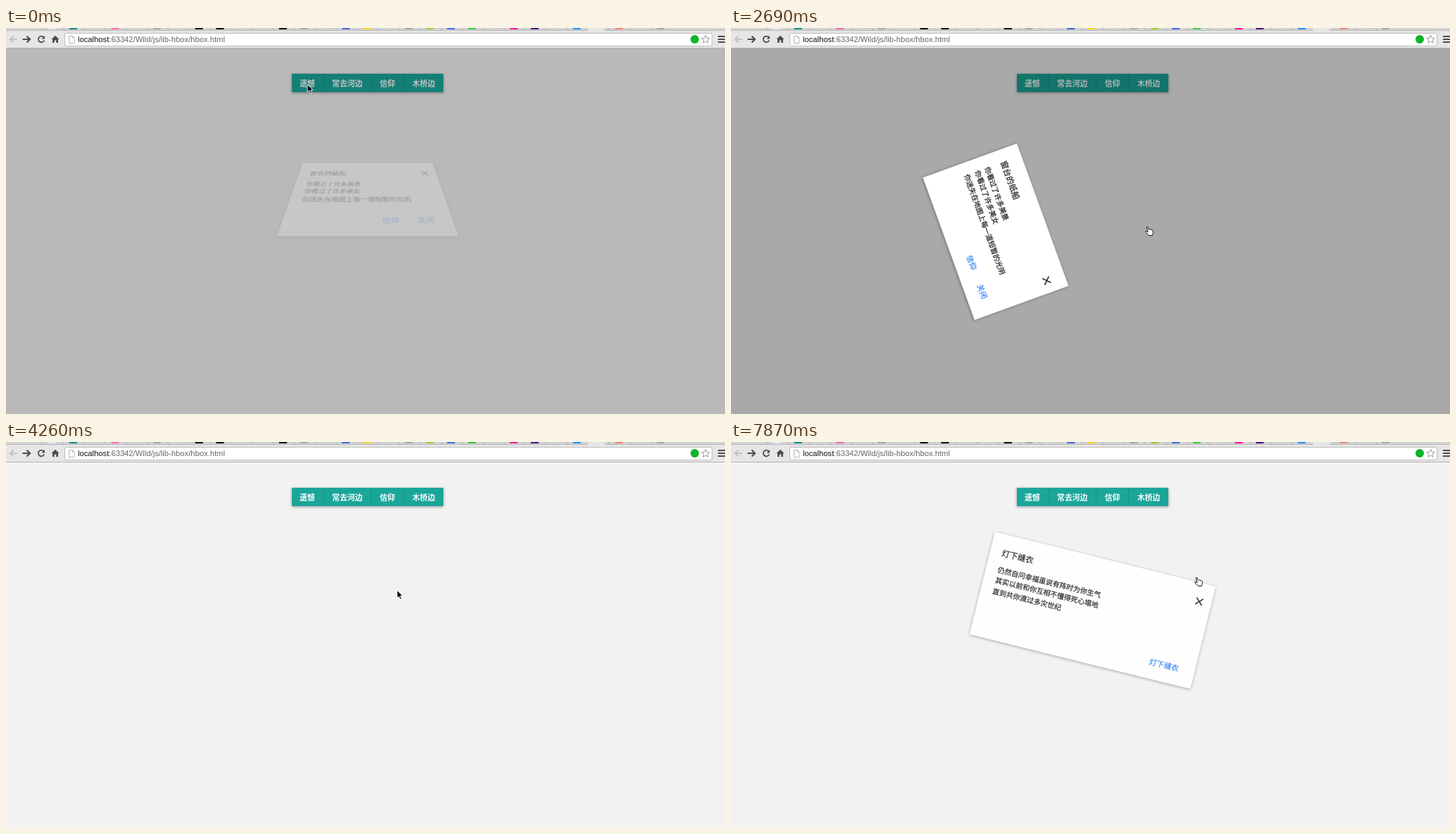
An HTML page for the animation above (8 s loop, 1021 by 548 pixels).

```html
<!DOCTYPE html>
<html lang="zh">
<head>
<meta charset="utf-8">
<title>hbox</title>
<style>
html, body { margin: 0; width: 100%; height: 100%; overflow: hidden; background: #f2f2f2; }
body { position: relative; font-family: "Noto Sans CJK SC", "Noto Sans CJK", sans-serif; }
body > *, .box * { position: absolute; }
#chrome { left: 0; top: 0; }
#bar { left: 405.5px; top: 65px; width: 215.5px; height: 26px; display: flex; background: #1aa699; box-shadow: 0 1px 4px rgba(0,0,0,.4); }
#bar b { padding: 0 12px 0 11.5px; font-size: 10.8px; line-height: 26px; color: #fff; white-space: nowrap; }
#bar b + b { border-left: 1px solid #17958a; }
#shade { left: 0; top: 29px; width: 1021px; height: 519px; background: #000; }
.box { top: 164px; background: #fff; box-shadow: 0 1px 4px rgba(0,0,0,.35); border-radius: 1px; }
.box span { line-height: 16px; white-space: nowrap; color: #1c1c1c; font-size: 10.05px; -webkit-text-stroke: .2px; }
.box .title { left: 17px; top: 18px; font-size: 11.5px; }
.box .act { color: #3483f8; font-size: 10.7px; bottom: 16px; }
.box svg { right: 12px; top: 20.5px; }
#first { left: 405.5px; width: 214.5px; height: 142px; }
#second { left: 351.7px; width: 323px; height: 150px; }
#cursor { left: 0; top: 0; overflow: visible; }
</style>
</head>
<body>
<svg id="chrome" width="1021" height="29">
  <rect width="1021" height="29" fill="#e6e6e6"/>
  <rect width="1021" height="4" fill="#d2d2d2"/>
  <g id="tabs"></g>
  <path d="M0 3.5H1021" stroke="#b9b9b9"/>
  <rect x="826" width="24" height="4" fill="#e6e6e6"/>
  <path d="M0 28.5H1021" stroke="#b2b2b2"/>
  <rect x="83.5" y="7.5" width="919" height="18" rx="2" fill="#fff" stroke="#bdbdbd"/>
  <g fill="none" stroke="#4d4d4d" stroke-width="2.2">
    <path d="M16 16H6M10.5 11.5L6 16L10.5 20.5" stroke="#c3c3c3"/>
    <path d="M23.5 16H33.5M29.5 11.5L34 16L29.5 20.5"/>
    <path d="M53.5 13.2A4.3 4.3 0 1 0 54.2 17.5" stroke-width="1.8"/>
    <path d="M1011 12H1021M1011 16H1021M1011 20H1021"/>
  </g>
  <path d="M55 11V15.5H50.5Z" fill="#4d4d4d"/>
  <path d="M70 10.8L75.5 16H74V21H71.3V17.5H68.7V21H66V16H64.5Z" fill="#4d4d4d"/>
  <path d="M89.5 11.5H94.5L97 14V21.5H89.5ZM94.5 11.5V14H97" fill="#fff" stroke="#b5b5b5"/>
  <text x="102" y="20" font-family="Liberation Sans, Arial, sans-serif" font-size="11.23" fill="#666"><tspan fill="#111">localhost</tspan>:63342/Wild/js/lib-hbox/hbox.html</text>
  <circle cx="978" cy="16" r="6" fill="#0cb42a"/>
  <path id="star" fill="#fff" stroke="#999"/>
</svg>
<div id="bar"><b>遗憾</b><b>常去河边</b><b>信仰</b><b>木桥边</b></div>
<div id="shade"></div>
<div class="box" id="first"></div>
<div class="box" id="second"></div>
<svg id="cursor" width="16" height="18" stroke-linejoin="round">
  <path id="arrow" d="M0 0V11L2.6 8.7L4.5 12.8L6.4 12L4.6 8H8Z" fill="#000" stroke="#fff" stroke-width=".9"/>
  <path id="hand" d="M2.2 7.5L.3 2Q0 0 1.7 .3L3.3 4.2Q4.5 3 5.3 4.3Q6.7 3.4 7.3 4.9Q9 4.4 9.2 6.3L9.3 9.5L8.3 12.5H3.5L-1 8.2Q-2.2 6.2 -.3 6.3Z" fill="#fff" stroke="#111"/>
</svg>
<script>
const $ = id => document.getElementById(id);

// One favicon per tab slot; "-" leaves the slot empty.
const favicons = 'lavender darkcyan - hotpink - darkgrey - black black - - black darkgrey - royalblue gold - darkgrey ' +
  'yellowgreen royalblue limegreen - deeppink indigo - dodgerblue - salmon - darkgrey';
$('tabs').innerHTML = favicons.split(' ').map((color, i) => {
  const x = 50 + 29.8 * i;
  const icon = color === '-' ? '' : `<rect x="${x + 10}" width="11" height="2" fill="${color}"/>`;
  return `<path d="M${x} 0L${x + 4} 3.5" stroke="#aaa"/>` + icon;
}).join('');

const starPoint = (_, i) => {
  const r = i % 2 ? 2.7 : 6.2, a = i * Math.PI / 5;
  return `${993.5 + r * Math.sin(a)} ${16.3 - r * Math.cos(a)}`;
};
$('star').setAttribute('d', `M${Array.from({ length: 10 }, starPoint).join('L')}Z`);

function fill(id, title, lines, actions) {
  $(id).innerHTML = `<span class="title">${title}</span>` +
    lines.map((s, i) => `<span style="left:17px;top:${42.5 + 15.8 * i}px">${s}</span>`).join('') +
    actions.map((s, i) => `<span class="act" style="right:${23 + 44 * i}px">${s}</span>`).join('') +
    '<svg width="11" height="11"><path d="M.7 .7L10.3 10.3M10.3 .7L.7 10.3" stroke="#333" stroke-width="1.7"/></svg>';
}
fill('first', '窗台的纸船', ['你看过了许多美景', '你看过了许多美女', '你迷失在地图上每一道短暂的光阴'], ['关闭', '信仰']);
fill('second', '灯下缝衣', ['仍然自问幸福虽说有阵时为你生气', '其实以前和你互相不懂得死心塌地', '直到共你渡过多灾世纪'], ['灯下缝衣']);

const clamp = v => Math.min(1, Math.max(0, v));
const progress = (t, from, to) => clamp((t - from) / (to - from));
const easeIn = p => p ** 1.7;
const easeInOut = p => p * p * (3 - 2 * p);

// Evenly spaced key values, eased from each to the next.
function keyed(p, values, ease) {
  const at = clamp(p) * (values.length - 1);
  const i = Math.min(Math.floor(at), values.length - 2);
  return values[i] + (values[i + 1] - values[i]) * ease(at - i);
}

function pose(id, shown, transform, opacity, origin = '50% 50%') {
  Object.assign($(id).style, { display: shown ? '' : 'none', transform, opacity, transformOrigin: origin });
}

// Flips in around its middle, later swings from its corner and drops.
function drawFirst(t) {
  if (t < 2092) {
    const p = progress(t, -237, 763);
    const tilt = p < .4 ? 90 - 110 * easeIn(p / .4) : keyed((p - .4) / .6, [-20, 10, -5, 0], easeIn);
    pose('first', true, p < 1 ? `perspective(300px) rotateX(${tilt}deg)` : 'none', easeIn(clamp(p / .6)));
  } else {
    const p = progress(t, 2092, 4092);
    const fall = easeInOut(progress(p, .8, 1));
    pose('first', t < 4060, `translateY(${700 * fall}px) rotate(${keyed(p, [0, 80, 60, 80, 60, 0], easeInOut)}deg)`,
      1 - fall, '0 0');
  }
}

// Rolls in from the left, later starts to spin out.
function drawSecond(t) {
  if (t < 7870) {
    const k = .32 * Math.exp((5630 - t) / 142);
    pose('second', t >= 5630, `translateX(${-330 * k}px) rotate(${-88 * k}deg)`, 1 - k);
  } else pose('second', true, 'rotate(13.9deg)', .93);
}

function drawCursor(t) {
  let x = 428, y = 80;
  const move = (from, to, toX, toY) => {
    const p = easeInOut(progress(t, from, to));
    x += (toX - x) * p;
    y += (toY - y) * p;
  };
  move(1150, 1850, 590, 282);
  move(3920, 4780, 490, 76);
  move(5630, 6080, 495, 93);
  move(6530, 7210, 660, 192);
  const hand = t >= 1850 && t < 4000 || t >= 7050;
  $('cursor').style.transform = `translate(${x}px,${y}px)`;
  $('arrow').style.display = hand ? 'none' : '';
  $('hand').style.display = hand ? '' : 'none';
}

function draw(t) {
  drawFirst(t);
  drawSecond(t);
  drawCursor(t);
  $('shade').style.opacity = t < 4260 ? .235 + .065 * progress(t, 0, 1010) : 0;
  $('bar').children[1].style.background = t >= 4740 && t < 6740 ? '#189388' : '';
}

const start = performance.now();
function loop() {
  draw((performance.now() - start) % 8000);
  requestAnimationFrame(loop);
}
loop();
</script>
</body>
</html>
```
